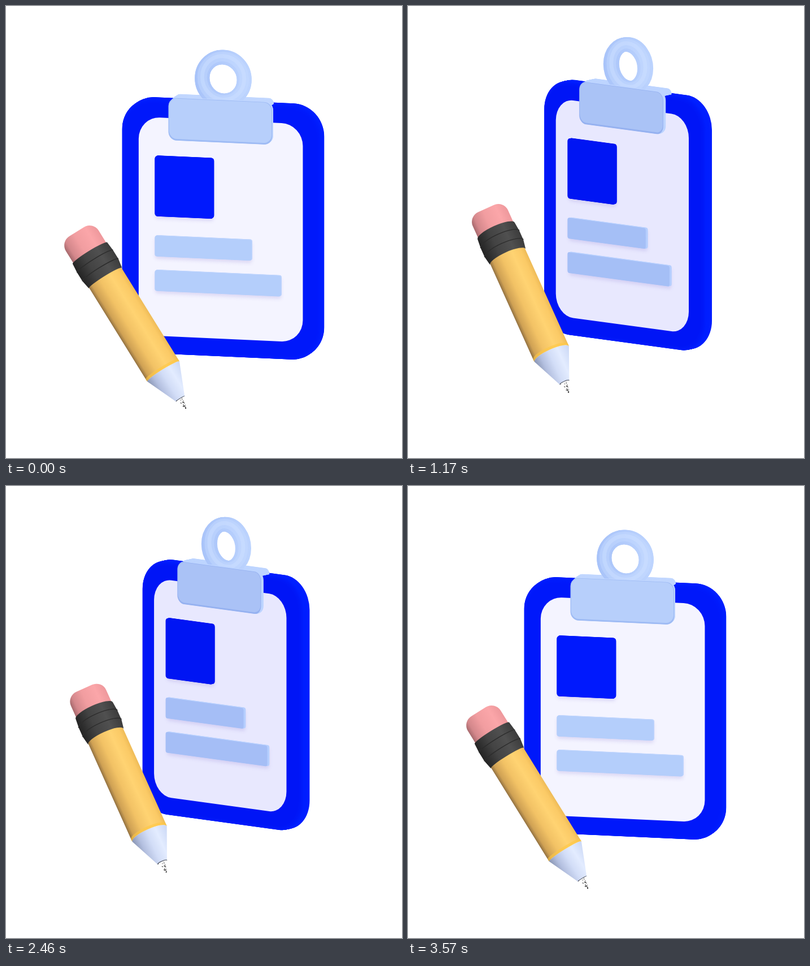
Write an HTML page with a canvas that moves like this. It is 701 by 799 pixels and loops after 3.6 s.

```html
<!DOCTYPE html>
<html>
<head>
<meta charset="utf-8">
<title>Clipboard and pencil</title>
<style>
html, body { margin: 0; width: 100%; height: 100%; overflow: hidden; background: #fff; }
canvas { display: block; }
</style>
</head>
<body>
<canvas id="stage" width="701" height="799"></canvas>
<script>
const ctx = document.getElementById('stage').getContext('2d');
const LOOP = 3600, STEP = 30, RISE_END = 1792, FALL_START = 1870;
const TILT = 0.17; // sine of the camera pitch
const PENCIL_LENGTH = 195.5; // yellow shaft, before foreshortening

const ease = k => (1 - Math.cos(Math.PI * k)) / 2;
const quad = (c, a, b, u) => c + a * u + b * u * u;
const mix = (from, to, u) => `rgb(${from.map((v, i) => Math.round(v + (to[i] - v) * u))})`;

function turnAt(t) {
  if (t < RISE_END) return ease(t / RISE_END);
  if (t < FALL_START) return 1;
  return 1 - ease((t - FALL_START) / (LOOP - FALL_START));
}

let view;

function setView(u) {
  const angle = (14.8 + 32.4 * u) * Math.PI / 180;
  view = {
    cos: Math.cos(angle), sin: Math.sin(angle),
    x: quad(384.5, 18.2, -14.7, u), y: 400 - 32.2 * u,
    height: 1 - 0.005 * u
  };
}

// Orthographic projection of the plane at depth z
function plane(z) {
  const { cos, sin, x, y, height } = view;
  ctx.setTransform(cos, sin * TILT, 0, height, x - z * sin, y + z * cos * TILT);
}

function panel(x0, y0, x1, y1, r, z, fill, inset = 0) {
  plane(z);
  ctx.fillStyle = fill;
  ctx.beginPath();
  ctx.roundRect(x0 + inset, y0 + inset, x1 - x0 - 2 * inset, y1 - y0 - 2 * inset, r);
  ctx.fill();
}

function slab(x0, y0, x1, y1, r, z0, z1, fill) {
  for (let z = z0; z <= z1; z++) panel(x0, y0, x1, y1, r, z, fill);
}

function drawBoard(u) {
  const side = [0, 31, 255], front = [0, 24 - 4 * u, 250 - 6 * u];
  for (let z = -8; z <= 14; z++) {
    const bevel = Math.max(0, z - 8);
    panel(-182.8, -232, 182.8, 218, 56 - bevel, z, mix(side, front, bevel / 6), bevel * bevel * 0.2);
  }
  panel(-150.3, -200.7, 150.3, 185.3, 39, 17, mix([244, 244, 255], [228, 228, 253], u));
}

function drawItem(x1, y0, y1, r, side, front) {
  const x0 = -119.2;
  ctx.shadowColor = 'rgba(130,115,205,.22)';
  ctx.shadowBlur = 6;
  ctx.shadowOffsetX = -1;
  ctx.shadowOffsetY = 5;
  panel(x0, y0, x1, y1, r, 17, side);
  ctx.shadowColor = 'transparent';
  slab(x0, y0, x1, y1, r, 18, 22, side);
  panel(x0, y0, x1, y1, r, 23, front);
}

function drawItems(u) {
  const barSide = mix([190, 212, 253], [179, 205, 255], u);
  const barFront = mix([180, 206, 251], [160, 185, 244], u);
  const blue = mix([0, 25, 253], [0, 20, 240], u);
  drawItem(-12.2, -133.6, -27, 5, blue, blue);
  drawItem(57.8, 7.3, 44, 4, barSide, barFront);
  drawItem(111.6, 68.3, 105, 4, barSide, barFront);
}

function drawRing() {
  const R = 38.5, y = -271;
  const shade = ctx.createLinearGradient(view.x - 48, 0, view.x + 48, 0);
  shade.addColorStop(0, '#a8c3f9');
  shade.addColorStop(1, '#bdd4fe');
  const loop = (z, width, color, lift = 0) => {
    plane(z);
    ctx.beginPath();
    ctx.ellipse(0, y - lift, R, R, 0, 0, 2 * Math.PI);
    ctx.resetTransform();
    ctx.lineWidth = width;
    ctx.strokeStyle = color;
    ctx.stroke();
  };
  for (let z = -2.5; z <= 2.5; z++) loop(z, 25, shade);
  loop(0, 17, 'rgba(200,220,255,.4)', 1);
  loop(0, 7, 'rgba(208,226,255,.4)', 2);
}

function drawClip(u) {
  const light = mix([192, 214, 254], [188, 211, 255], u);
  slab(-90, -239, 90, -229, [9, 9, 1, 1], -10, 13, light);
  drawRing();
  slab(-95, -237, 95, -162, 15, 13, 19, light);
  panel(-95, -237, 95, -162, 15, 20, mix([158, 187, 244], [146, 174, 238], u));
  panel(-94.5, -237, 94.5, -164, 14, 20, mix([183, 207, 251], [165, 190, 244], u), 0.8);
}

function across(half, ...stops) {
  const g = ctx.createLinearGradient(0, -half, 0, half);
  stops.forEach(([at, color]) => g.addColorStop(at, color));
  return g;
}

// Near half of a round cross-section, bulging toward the eraser
function rim(s, half, bow, back = false) {
  const top = 1.5 * Math.PI, bottom = 0.5 * Math.PI;
  ctx.ellipse(s, 0, bow * half / 34, half, 0, back ? bottom : top, back ? top : bottom, !back);
}

// Piece of the pencil from s0 to s1 along its axis
function section(s0, h0, s1, h1, bow, fill) {
  ctx.fillStyle = fill;
  ctx.beginPath();
  rim(s0, h0, bow);
  ctx.lineTo(s1, h1);
  rim(s1, h1, bow, true);
  ctx.fill();
}

function strokeRim(s, half, bow, color, width) {
  ctx.strokeStyle = color;
  ctx.lineWidth = width;
  ctx.beginPath();
  rim(s, half, bow);
  ctx.stroke();
}

function drawLead() {
  let seed = 7;
  const random = () => (seed = seed * 16807 % 2147483647) / 2147483647;
  ctx.fillStyle = '#222';
  for (let i = 0; i < 30; i++) {
    const k = random();
    const v = (random() * 2 - 1) * 8 * (1 - k);
    ctx.fillRect(250 + 21 * k, v, 1.1, 1.1);
  }
}

function drawPencil(u) {
  const x0 = quad(176, -13.7, 20.2, u), y0 = quad(481, -50.7, -0.8, u);
  const dx = quad(278.5, -35.8, 3.8, u) - x0, dy = quad(646, -40.6, -1.9, u) - y0;
  const length = Math.hypot(dx, dy);
  const bow = 34 * Math.sqrt(1 - (length / PENCIL_LENGTH) ** 2);
  ctx.resetTransform();
  ctx.translate(x0, y0);
  ctx.rotate(Math.atan2(dy, dx));
  ctx.scale(length / 194, 1);

  ctx.fillStyle = across(34, [0, '#ee989c'], [0.25, '#fba6a9'], [0.6, '#f19da0'], [0.88, '#d3878b'], [1, '#a86a6e']);
  ctx.beginPath();
  ctx.roundRect(-96.5, -34.2, 55, 68.4, [19, 0, 0, 19]);
  ctx.fill();

  section(194, 33.5, 251, 9, bow, across(33, [0, '#cbd8f5'], [0.3, '#e3ecff'], [0.55, '#d2ddf7'], [0.8, '#b3bfdf'], [1, '#8a96b4']));
  strokeRim(251, 9, bow, '#444a58', 1);
  drawLead();

  section(-2, 33.7, 194, 33.7, bow, across(33.7, [0, '#eebb57'], [0.12, '#fbca66'], [0.35, '#ffd372'], [0.65, '#f2c265'], [0.9, '#cfa154'], [1, '#927141']));
  section(189, 33.7, 194, 33.7, bow, 'rgba(255,200,65,.6)');

  const metal = across(38, [0, '#3b3b3b'], [0.3, '#505050'], [0.65, '#434343'], [1, '#232323']);
  section(-52, 36, -35, 37.5, bow, metal);
  section(-35, 37.5, -17, 37.5, bow, metal);
  section(-17, 37.5, 0, 34.5, bow, metal);
  strokeRim(-35, 37.5, bow, '#2b2b2b', 1.4);
  strokeRim(-17, 37.5, bow, '#2b2b2b', 1.4);
}

function draw(now) {
  const u = turnAt(Math.floor(now % LOOP / STEP) * STEP);
  ctx.resetTransform();
  ctx.fillStyle = '#fff';
  ctx.fillRect(0, 0, 701, 799);
  setView(u);
  drawBoard(u);
  drawItems(u);
  drawClip(u);
  drawPencil(u);
}

let start;
function tick(now) {
  start ??= now;
  draw(now - start);
  requestAnimationFrame(tick);
}
draw(0);
requestAnimationFrame(tick);
</script>
</body>
</html>
```
